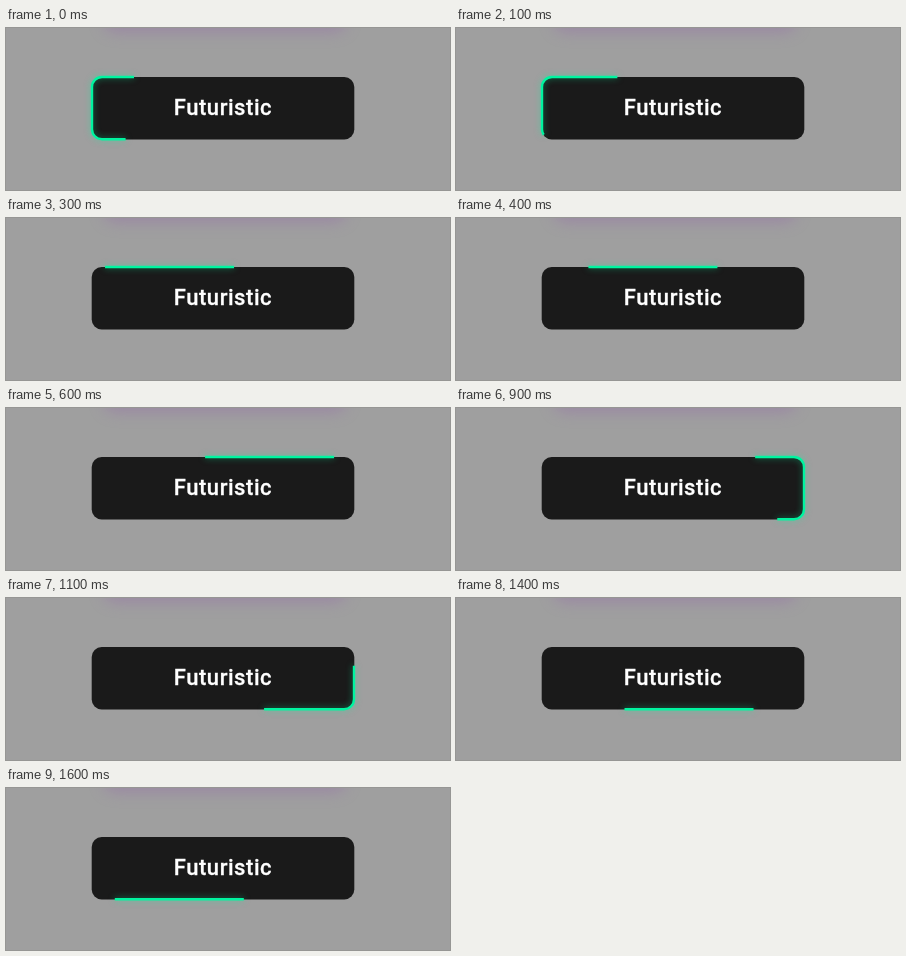
Recreate the animation shown at these times as an HTML page. Size 444 by 162 pixels, loop 1.7 s.

```html
<!DOCTYPE html>
<html lang="en">
<head>
<meta charset="utf-8">
<title>Futuristic button</title>
<style>
  html, body { margin: 0; width: 100%; height: 100%; overflow: hidden; background: #9f9f9f; }
  svg { display: block; width: 444px; height: 162px; }
  .halo { fill: #9670a8; opacity: .5; filter: blur(7.5px); }
  .button { fill: #1a1a1a; }
  .beam { fill: none; stroke: #00f5a0; stroke-width: 2.4; filter: drop-shadow(0 0 3px rgba(0, 245, 160, .5)); }
  text { font: 500 22px Roboto, sans-serif; letter-spacing: .55px; fill: #fff; stroke: #fff; stroke-width: .3; }
</style>
</head>
<body>
<svg viewBox="0 0 444 162">
  <rect class="halo" x="98" y="-60" width="242" height="64" rx="10"/>
  <rect class="button" x="85.7" y="49" width="262.6" height="62.5" rx="10"/>
  <text x="167.8" y="87.3">Futuristic</text>
  <rect class="beam" x="86" y="49" width="262" height="62.2" rx="10"/>
</svg>
<script>
  const LOOP = 1700, STEP = 100, BEAM = 129;
  const beam = document.querySelector('.beam');
  beam.style.strokeDasharray = `${BEAM} ${beam.getTotalLength() - BEAM}`;

  // Distance of the beam's head along the outline; it slows after one second.
  const headAt = t => 32 + Math.min(t, 1000) * 0.3335 + Math.max(t - 1000, 0) * 0.2985;

  function draw(now) {
    const t = Math.floor((now % LOOP) / STEP) * STEP;
    beam.style.strokeDashoffset = BEAM - headAt(t);
    requestAnimationFrame(draw);
  }
  draw(0);
</script>
</body>
</html>
```
